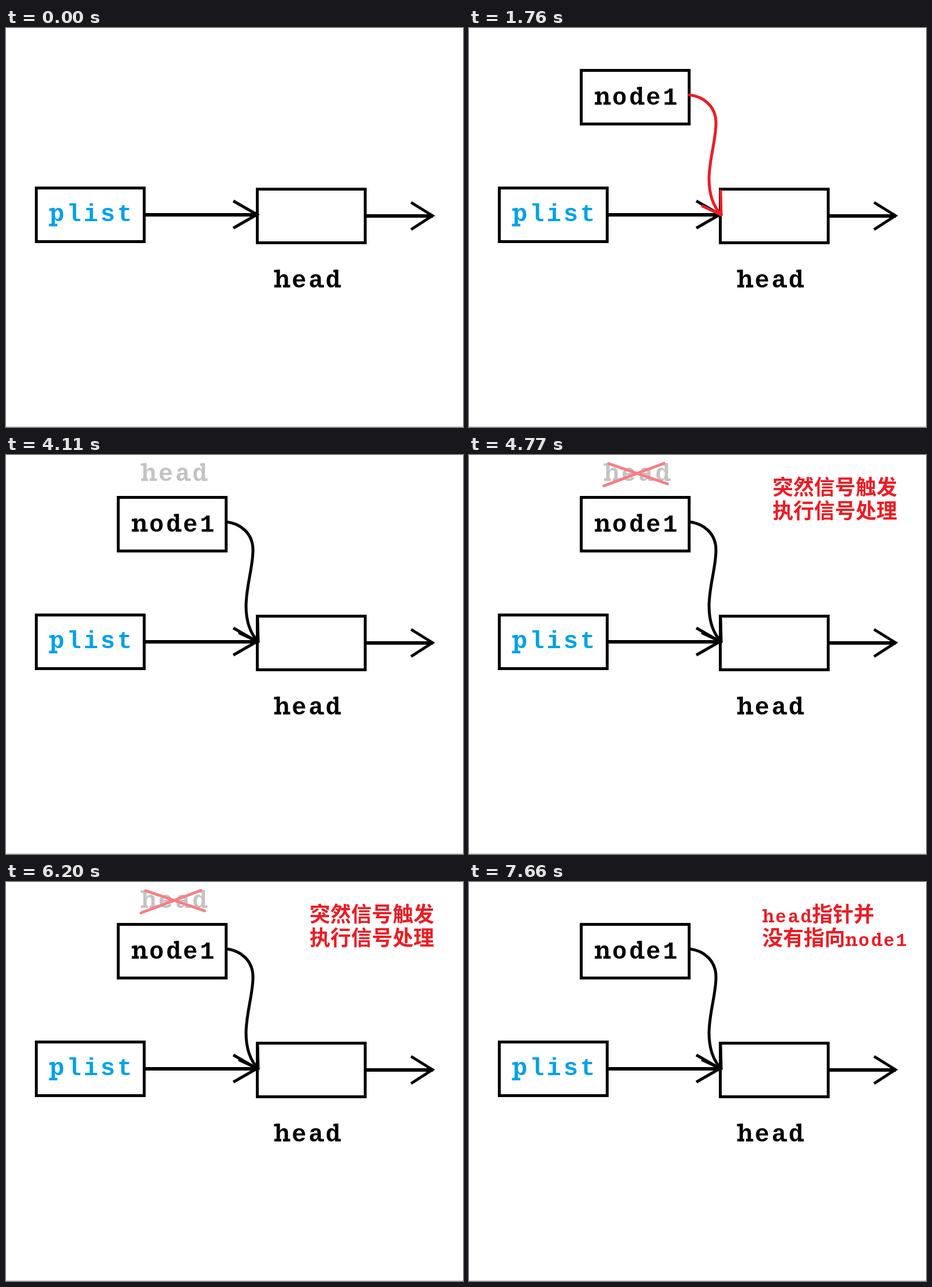
Animation, 792 px wide and 692 px high, one loop 8 s. Source, as an HTML page:

```html
<!DOCTYPE html>
<html lang="zh">
<head>
<meta charset="utf-8">
<title>List insertion</title>
<style>
  html, body { margin: 0; width: 100%; height: 100%; overflow: hidden; background: #fff; }
  svg { display: block; width: 792px; height: 692px; }
  .line { fill: none; stroke: #000; stroke-width: 5; }
  .round { stroke-linecap: round; stroke-linejoin: round; }
  .mono { font: bold 42px "Liberation Mono", monospace; letter-spacing: 4.05px; }
  .serif { fill: none; stroke: currentColor; stroke-width: 4.4; }
  .big { font: bold 36px "Noto Sans CJK SC", "Noto Sans CJK", sans-serif; fill: #ed1c24; }
  .small { font: 26.5px "Noto Sans", "Noto Sans CJK SC", "Noto Sans CJK", sans-serif; fill: #ed1c24; text-anchor: middle; }
</style>
</head>
<body>
<svg id="stage" viewBox="0 0 792 692"></svg>
<script>
const LOOP = 8000, PITCH = 29.25;
const RED = '#ed1c24', BLUE = '#00a2e8', GREY = '#c3c3c3', PINK = '#f67f85';
const stage = document.getElementById('stage');

// Slab feet added to the plain monospace letters, per letter cell.
const slabs = {
  h: 'M1-2.2H13M16-2.2H28.5M.5-28.4H8',
  n: 'M1-2.2H13M16-2.2H28.5M1-20H7',
  d: 'M22-2.2H28.5M15.5-28.4H22',
  p: 'M1-20H7M.5 6.8H15',
  a: 'M22-2.2H28.5'
};

const box = (x, y) => `<rect class="line" x="${x}" y="${y}" width="187" height="93"/>`;
const path = (d, color = '#000', width = 5, kind = '') =>
  `<path class="line ${kind}" d="${d}" style="stroke:${color};stroke-width:${width}"/>`;
const text = (kind, x, y, value) => `<text class="${kind}" x="${x}" y="${y}">${value}</text>`;

function mono(value, x, y, color, scale = 1) {
  const feet = [...value].map((c, i) => slabs[c]
    ? `<path class="serif" transform="translate(${i * PITCH})" d="${slabs[c]}"/>` : '').join('');
  return `<g transform="translate(${x} ${y}) scale(${scale})" style="color:${color}">
    <text class="mono" x="2" fill="${color}">${value}</text>${feet}</g>`;
}

const link = color =>
  path('M382 116C408 119 428 137 428 165C428 195 416 228 416 262C416 290 424 310 437 324', color, 5, 'round') +
  path('M405 309L437 324L436 283', color, 5, 'round');

const small = (x1, y1, a, x2, y2, b) => text('small', x1, y1, a) + text('small', x2, y2, b);

const fixed =
  box(52.5, 277.5) + box(435.5, 279.5) +
  path('M242 324H436', '#000', 6) + path('M394 300L435 323.5L394 347') +
  path('M625 326H740', '#000', 6) + path('M702 302.5L739 325.5L702 349.5') +
  mono('plist', 74, 335, BLUE) + mono('head', 464, 450, '#000') +
  path('M0 691.5H792', '#c3c3c3', 1);

// Each part with the spans of time in which it is visible.
const parts = [
  [box(194.5, 73.5), [590, LOOP]],
  [mono('node1', 217, 133, '#000'), [930, LOOP]],
  [link(RED), [930, 1330], [1760, 2160]],
  [link('#000'), [2160, LOOP]],
  [mono('head', 233, 45, GREY), [2530, 2900], [3370, 3710], [4110, 5130], [6200, 6810], [7270, 7660]],
  [path('M242 15L344 50M338 14.5L234 53.5', PINK, 5, 'round'), [4770, 5130], [6200, 6810], [7270, 7660]],
  [small(638.5, 77, '突然信号触发', 638.5, 112, '执行信号处理'), [4210, 4770], [5130, 6200]],
  [text('big', 526, 69, '突然信号触发') + text('big', 526, 110, '执行信号处理'), [4770, 5130], [6200, 6600]],
  [small(658.5, 87, 'head指针并', 661, 122, '没有指向node1'), [6600, 7390]],
  [mono('head', 508, 70, RED, .74) + text('big', 594.5, 69, '指针并') +
   text('big', 508, 110, '没有指向') + mono('node1', 652, 111, RED, .74), [7390, LOOP]]
];

stage.innerHTML = fixed + parts.map(([art]) => `<g visibility="hidden">${art}</g>`).join('');
const groups = [...stage.children].slice(-parts.length);

const start = performance.now();
function draw(now) {
  const t = Math.max(0, now - start) % LOOP;
  parts.forEach(([, ...spans], i) => {
    const on = spans.some(([from, to]) => t >= from && t < to);
    groups[i].setAttribute('visibility', on ? 'visible' : 'hidden');
  });
  requestAnimationFrame(draw);
}
draw(start);
</script>
</body>
</html>
```
